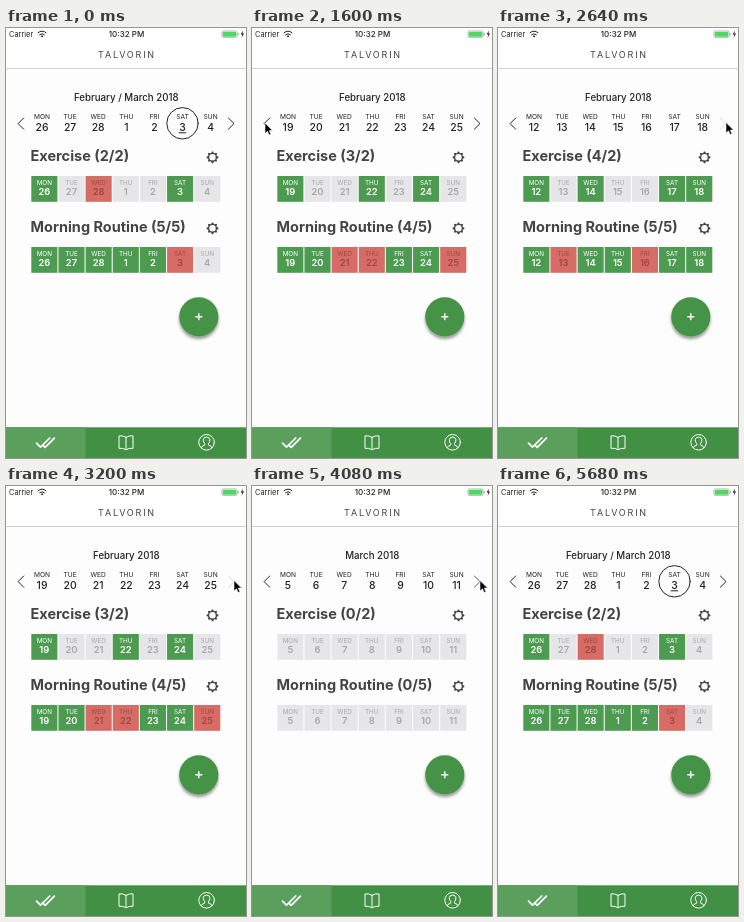
An HTML page for the animation above (6560 ms loop, 240 px wide and 430 px high).

```html
<!DOCTYPE html>
<html lang="en">
<head>
<meta charset="utf-8">
<title>Habit week</title>
<style>
html, body { margin: 0; width: 100%; height: 100%; overflow: hidden; background: #fdfdfd; }
svg { display: block; width: 240px; height: 430px; }
text { font-family: Inter, Roboto, sans-serif; fill: #222; }
.mid { text-anchor: middle; }
.line { fill: none; stroke: #222; stroke-width: 1; stroke-linecap: round; stroke-linejoin: round; }
.white { stroke: #fff; }
.heading { font-size: 14.5px; font-weight: 700; fill: #444; }
</style>
</head>
<body>
<svg viewBox="0 0 240 430">
  <defs>
    <filter id="shadow" x="-40%" y="-40%" width="180%" height="180%">
      <feDropShadow dx="0" dy="2.5" stdDeviation="1.7" flood-opacity=".42"/>
    </filter>
  </defs>
  <rect width="240" height="40" fill="#fff"/>
  <path d="M0 40.5H240" stroke="#d0d0d2"/>

  <text x="3" y="8.8" font-size="7.4">Carrier</text>
  <g class="line" stroke-width="1.3">
    <path d="M32 4.8Q36 1.2 40 4.8M33.6 6.7Q36 4.6 38.4 6.7"/>
    <circle cx="36" cy="8.3" r=".6"/>
  </g>
  <text class="mid" x="120.5" y="8.8" font-size="8" font-weight="500">10:32 PM</text>
  <rect x="215.9" y="2.9" width="15.2" height="6.6" rx="1.5" fill="none" stroke="#999" stroke-width=".6"/>
  <rect x="216.7" y="3.7" width="13.6" height="5" rx=".8" fill="#4cd964"/>
  <path d="M232.1 5v2.4" stroke="#999"/>
  <path d="M237 2.5l-2.4 4h1.7l-.7 3.3 2.5-4.2h-1.7z" fill="#222"/>
  <text class="mid" x="121" y="30.2" font-size="9" letter-spacing="1.8" style="fill:#444">TALVORIN</text>

  <path id="prev" class="line" d="M17.7 90l-5.6 5.6 5.6 5.6"/>
  <path id="next" class="line" d="M222.4 90l5.6 5.6-5.6 5.6"/>
  <g id="week"></g>
  <g id="gears"></g>

  <circle cx="192.8" cy="288.8" r="19.6" fill="#459347" filter="url(#shadow)"/>
  <path d="M189.3 288.8h7M192.8 285.3v7" stroke="#fff" stroke-width="1.4"/>

  <rect y="399.3" width="240" height="30.7" fill="#419044"/>
  <rect y="399.3" width="79.5" height="30.7" fill="#5aa05c"/>
  <path class="line white" style="stroke-width:1.7" d="M30.5 415.2l4 4 9.3-9.2M37.2 417.5l2 1.8 9.2-9.2"/>
  <path class="line white" d="M120 409.3q-3-2-7-1.4v12.4q4-.5 7 1.5 3-2 7-1.5v-12.4q-4-.6-7 1.4zv12"/>
  <g class="line white">
    <circle cx="200.6" cy="414.3" r="7.8"/>
    <path d="M195 419.7q.4-1.6 3.7-2.6v-1.5q-1.6-1.5-1.4-4 .4-2.5 3.3-2.5t3.3 2.5q.2 2.5-1.4 4v1.5q3.3 1 3.7 2.6"/>
  </g>
  <path id="cursor" d="M0 0V10.6L2.5 8.3 4.1 12 5.9 11.2 4.3 7.6H7.6z" fill="#000" stroke="#fff" stroke-width=".6"/>
</svg>
<script>
const LOOP = 6560, STEP = 80;
const DAYS = ["MON", "TUE", "WED", "THU", "FRI", "SAT", "SUN"];
// Cell states: g = done, r = missed, - = empty
const WEEKS = [
  { title: "February 2018", first: 12, score: ["4/2", "5/5"], cells: ["g-g--gg", "grggrgg"] },
  { title: "February 2018", first: 19, score: ["3/2", "4/5"], cells: ["g--g-g-", "ggrrggr"] },
  { title: "February / March 2018", first: 26, score: ["2/2", "5/5"], cells: ["g-r--g-", "gggggr-"], today: 5 },
  { title: "March 2018", first: 33, score: ["0/2", "0/5"], cells: ["-------", "-------"] }
];
const HABITS = [["Exercise", 133], ["Morning Routine", 204]];
const COLORS = { g: ["#4d9b51", "#fff"], r: ["#d66c65", "#9c4843"], "-": ["#e6e6e8", "#a8a8aa"] };
// Press time, change time, button, resulting week
const CLICKS = [
  [1040, 1200, "prev", 1], [1760, 1920, "prev", 0],
  [2640, 2800, "next", 1], [3120, 3280, "next", 2],
  [3840, 4000, "next", 3], [4960, 5120, "prev", 2]
];
// Time and pointer tip
const PATH = [
  [320, 162, 407], [960, 13, 95], [2160, 13, 95],
  [2560, 228, 94.5], [4480, 228, 94.5], [4960, 13, 95]
];
const $ = id => document.getElementById(id);

const label = (s, x, y, size, weight, fill = "#222") =>
  `<text class="mid" x="${x}" y="${y}" font-size="${size}" font-weight="${weight}" style="fill:${fill}">${s}</text>`;

function drawWeek({ title, first, score, cells, today }) {
  const date = i => (first + i - 1) % 28 + 1;
  let out = label(title, 120.3, 73.3, 9.7, 500);
  DAYS.forEach((day, i) => {
    const x = 36 + i * 28.1;
    out += label(day, x, 91.4, 6.6, 400) + label(date(i), x, 103.4, 10.4, 500);
    if (i === today)
      out += `<circle class="line" cx="${x}" cy="95.3" r="15.7"/><path class="line" d="M${x - 3.3} 104.8h6.6"/>`;
  });
  HABITS.forEach(([name, y], row) => {
    out += `<text class="heading" x="24.5" y="${y}">${name} (${score[row]})</text>`;
    [...cells[row]].forEach((state, i) => {
      const x = 25.3 + i * 27.15, [fill, ink] = COLORS[state];
      out += `<rect x="${x}" y="${y + 15}" width="26.1" height="25.8" fill="${fill}"/>` +
        label(DAYS[i], x + 13, y + 24, 6.3, 400, ink) + label(date(i), x + 13, y + 33.6, 9.4, 600, ink);
    });
  });
  $("week").innerHTML = out;
}

function gear(cy) {
  let d = "";
  for (let i = 0; i < 32; i++) {
    const r = i % 4 < 2 ? 5.9 : 4.6, a = (i - .5) * Math.PI / 16;
    d += (i ? "L" : "M") + (206.5 + r * Math.cos(a)) + " " + (cy + r * Math.sin(a));
  }
  return `<path d="${d}z" fill="#444"/><circle cx="206.5" cy="${cy}" r="3.2" fill="#fdfdfd"/>`;
}
$("gears").innerHTML = gear(129.3) + gear(200.3);

function pointer(t) {
  let i = 0;
  while (i < PATH.length - 2 && t >= PATH[i + 1][0]) i++;
  const [a, b] = [PATH[i], PATH[i + 1]];
  const p = Math.max(0, Math.min(1, (t - a[0]) / (b[0] - a[0])));
  const e = p * p * (3 - 2 * p);
  return [1, 2].map(k => a[k] + (b[k] - a[k]) * e);
}

let shown = -1;
function render(t) {
  let week = 2;
  const opacity = { prev: 1, next: 1 };
  for (const [press, change, button, result] of CLICKS) {
    if (t >= change) week = result;
    if (t >= press) opacity[button] = t < change ? .17 : Math.min(1, .35 + (t - change) / 200);
  }
  if (week !== shown) drawWeek(WEEKS[shown = week]);
  for (const id in opacity) $(id).setAttribute("opacity", opacity[id]);
  $("cursor").setAttribute("transform", `translate(${pointer(t)})`);
  $("cursor").setAttribute("visibility", t >= 320 && t < 5680 ? "visible" : "hidden");
}

const start = performance.now();
function tick() {
  const t = (performance.now() - start) % LOOP;
  render(Math.floor(t / STEP) * STEP);
  requestAnimationFrame(tick);
}
tick();
</script>
</body>
</html>
```
